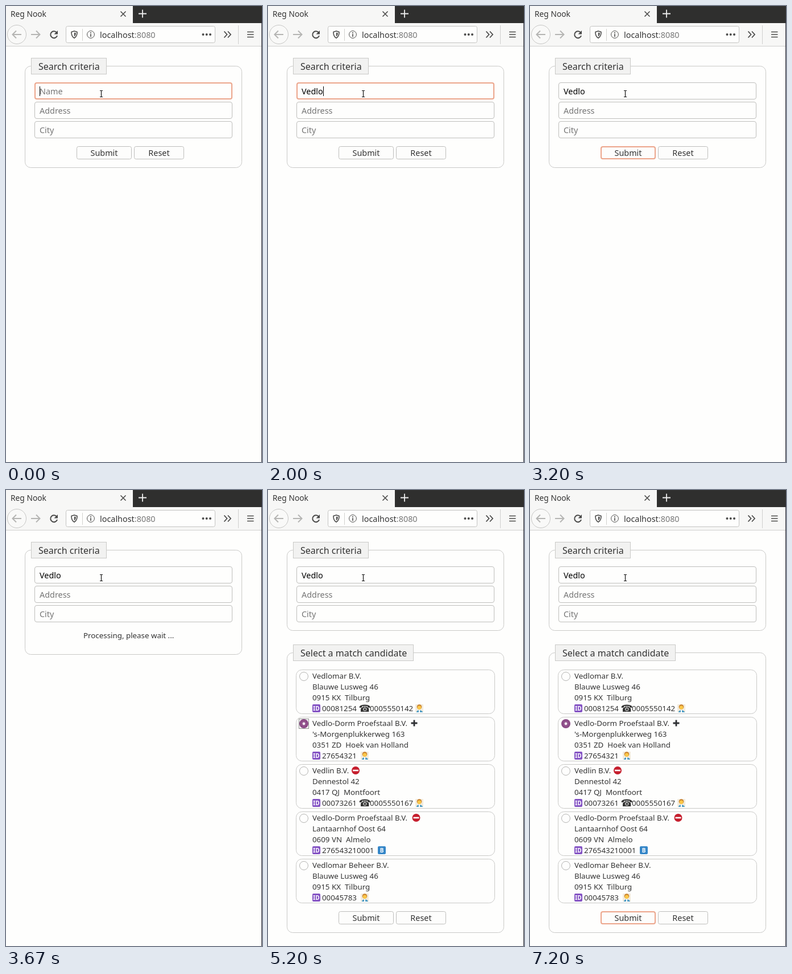
Animation, 450 px wide and 800 px high, one loop 8000 ms. Source, as an HTML page:

```html
<!DOCTYPE html>
<html lang="en">
<head>
<meta charset="utf-8">
<title>Company search</title>
<style>
  html, body { margin: 0; width: 100%; height: 100%; overflow: hidden; background: #fefefd; }
  svg { display: block; width: 450px; height: 800px; font-family: "Noto Sans", sans-serif; }
  text { white-space: pre; }
</style>
</head>
<body>
<svg id="stage" viewBox="0 0 450 800"></svg>
<script>
const LOOP = 8000;
const QUERY = 'Vedlo';
const LINE = '#c9c9c7', FOCUS = '#eca58b', INK = '#333';
const stage = document.getElementById('stage');

// Latest entry whose time has passed wins.
const typing = [[0, 0], [470, 1], [1400, 2], [1600, 3], [1730, 4], [2000, 5]];
const focus = [[0, 'name'], [2670, 'address'], [2930, 'city'], [3200, 'submit'],
  [3670, ''], [4130, 'radio'], [7200, 'submit']];
const choice = [[0, 0], [5200, 1], [5400, 2], [5600, 3], [6200, 2], [6400, 1]];
const phases = [[0, 'form'], [3670, 'wait'], [4130, 'results']];
const at = (track, t) => track.filter(([start]) => start <= t).pop()[1];

const companies = [
  { name: 'Vedlomar B.V.', street: 'Blauwe Lusweg 46', city: '0915 KX  Tilburg', id: '00081254', phone: '0005550142' },
  { name: 'Vedlo-Dorm Proefstaal B.V.', street: "'s-Morgenplukkerweg 163", city: '0351 ZD  Hoek van Holland', id: '27654321', mark: 'plus', markX: 257 },
  { name: 'Vedlin B.V.', street: 'Dennestol 42', city: '0417 QJ  Montfoort', id: '00073261', phone: '0005550167', mark: 'stop', markX: 154 },
  { name: 'Vedlo-Dorm Proefstaal B.V.', street: 'Lantaarnhof Oost 64', city: '0609 VN  Almelo', id: '276543210001', branch: true, mark: 'stop', markX: 260.5 },
  { name: 'Vedlomar Beheer B.V.', street: 'Blauwe Lusweg 46', city: '0915 KX  Tilburg', id: '00045783' }
];

const text = (x, y, s, size = 14.4, fill = INK, extra = '') =>
  `<text x="${x}" y="${y}" font-size="${size}" fill="${fill}" ${extra}>${s}</text>`;
const small = (x, y, s) => text(x, y, s, 13.333);
const box = (x, y, w, h, r = 0, stroke = LINE, fill = 'none', extra = '') =>
  `<rect x="${x}" y="${y}" width="${w}" height="${h}" rx="${r}" stroke="${stroke}" fill="${fill}" ${extra}/>`;
const path = (d, stroke, width = 2, extra = '') =>
  `<path d="${d}" stroke="${stroke}" stroke-width="${width}" fill="none" ${extra}/>`;
const disc = (x, y, r, fill, stroke = 'none') =>
  `<circle cx="${x}" cy="${y}" r="${r}" fill="${fill}" stroke="${stroke}"/>`;

function browser() {
  const dark = '#4b4b4a', pale = '#b5b5b3';
  return box(0, 0, 450, 71, 0, 'none', '#f7f7f6') +
    box(223, 0, 227, 30, 0, 'none', '#2f2f2e') +
    text(8, 19, 'Reg Nook', 13.8) +
    path('M201.5 9.5l9 9m0-9l-9 9', dark, 1.6) +
    path('M233 13.5h14M240 6.5v14', '#eee', 1.8) +
    path('M0 70.5H450', '#d0d0ce', 1) +
    disc(19, 50, 16.5, '#f9f9f8', '#c6c6c4') +
    path('M27 50H12m6-6.5L11.5 50l6.5 6.5', pale) +
    path('M44 50h15m-6-6.5l6.5 6.5-6.5 6.5', pale) +
    path('M89 46.5A6 6 0 1 0 90 52', dark) +
    `<path d="M91 43v6.5h-6.5z" fill="${dark}"/>` +
    box(105.5, 35.5, 262, 29, 3, '#c3c3c1', '#fefefd') +
    path('M120 44l5 1.5c.2 5-1 8.500-5 10.800-4-2.300-5.200-5.800-5-10.800z', dark, 1.6, 'stroke-linejoin="round"') +
    `<path d="M120 46.500l2.800.8c0 3-.8 5-2.800 6.500z" fill="${dark}"/>` +
    path('M134.500 40v21M408.500 34v33', '#d0d0ce', 1) +
    disc(149, 50, 6.4, 'none', dark) +
    path('M149 46v2m0 1v5', dark, 1.6) +
    text(165, 55.5, 'localhost<tspan fill="#777">:8080</tspan>') +
    [346.5, 352.7, 359].map(x => disc(x, 50, 2, dark)).join('') +
    path('M383.500 44.500l5 5.500-5 5.500M390 44.500l5 5.500-5 5.500', dark, 1.8) +
    path('M424 45.500h11.500m-11.500 4.500h11.500m-11.500 4.500h11.500', dark, 1.7);
}

const fieldset = (top, bottom, title, legendWidth) =>
  box(33.5, top + .5, 381, bottom - top, 10) +
  box(44.5, top - 13.5, legendWidth, 28, 0, LINE, '#f2f2f1') +
  text(57, top + 7, title, 16);

function field(y, value, hint, focused) {
  const frame = focused
    ? box(51, y + 1, 346, 28, 3, FOCUS, '#fefefd', 'stroke-width="2"')
    : box(50.5, y + .5, 347, 29, 3.5, '#bebebc', '#fefefd');
  return frame + text(59, y + 20.5, value || hint, 14.4, value ? '#000' : '#757575') +
    (focused ? `<path id="caret" data-value="${value}" d="M59.500 ${y + 7}v17" stroke="#000"/>` : '');
}

const button = (x, y, w, label, focused) =>
  (focused
    ? box(x + 1, y + 1, w - 1, 21, 3, FOCUS, '#fdfdfc', 'stroke-width="2"')
    : box(x + .5, y + .5, w, 22, 3, '#bebebc', '#fdfdfc')) +
  text(x + w / 2 + .5, y + 16.5, label, 14.4, INK, 'text-anchor="middle"');

const buttons = (y, focused) =>
  button(124, y, 96, 'Submit', focused) + button(225, y, 87, 'Reset', false);

const badge = (x, y, label, fill) =>
  box(x, y - 7, 14, 14, 2, 'none', fill) +
  text(x + 7, y + 3.7, label, 10, '#fff', 'text-anchor="middle" font-weight="700"');

const person = (x, y) =>
  box(x, y - 7, 14, 14, 1, 'none', '#f3ecdd') +
  `<path d="M${x + 2} ${y + 7}c0-5 10-5 11 0z" fill="#4d9bc4"/>` +
  disc(x + 7, y - 2.5, 4.3, '#c9822f') + disc(x + 7, y - 1.2, 3.3, '#fbc84a') +
  path(`M${x + 7} ${y + 3}v4`, '#fff', 2);

const marks = {
  plus: (x, y) => path(`M${x - 5.5} ${y}h11M${x} ${y - 5.5}v11`, '#2e3033', 2.8),
  stop: (x, y) => disc(x, y, 7, '#c51e2d') + path(`M${x - 5} ${y}h10`, '#fff', 2.6)
};

function radio(y, checked, focused) {
  const dot = checked
    ? disc(63, y, 8, '#8c4b87') + disc(63, y, 2.4, '#f6edf5') +
      `<circle cx="63" cy="${y}" r="4" fill="none" stroke="#b98ab5" stroke-dasharray="1 1.500"/>`
    : disc(63, y, 7.5, '#fefefd', '#b5b5b3');
  return dot + (focused ? box(54.5, y - 8.5, 17, 17, 0, '#222', 'none', 'stroke-dasharray="1 1"') : '');
}

function card(c, i, checked, focused) {
  const y = 326 + i * 83, idY = y + 57;
  const phone = c.phone
    ? text(159.5, idY + 5.5, '☎', 17, INK, 'font-family="DejaVu Sans, sans-serif"') + small(179, idY + 5, c.phone)
    : '';
  return box(49.5, y - 10.5, 349, 77, 10) +
    radio(y + 1, checked, focused) +
    [c.name, c.street, c.city].map((s, n) => small(78, y + 5 + n * 19, s)).join('') +
    (c.mark ? marks[c.mark](c.markX, y) : '') +
    badge(78, idY, 'ID', '#8453c4') + small(95, idY + 5, c.id) + phone +
    (c.branch ? badge(193, idY, 'B', '#3687c8') : person(c.phone ? 259 : 163, idY));
}

function results(active, chosen) {
  return fieldset(285, 776, 'Select a match candidate', 211) +
    companies.map((c, i) => card(c, i, i === chosen, i === chosen && active === 'radio')).join('') +
    buttons(739, active === 'submit');
}

function render(phase, typed, active, chosen) {
  const bottom = { form: 283, wait: 288, results: 246 }[phase];
  stage.innerHTML = box(0, 0, 450, 800, 0, 'none', '#fefefd') + browser() +
    fieldset(105, bottom, 'Search criteria', 132) +
    field(134, QUERY.slice(0, typed), 'Name', active === 'name') +
    field(168, '', 'Address', active === 'address') +
    field(202, '', 'City', active === 'city') +
    (phase === 'form' ? buttons(246, active === 'submit') : '') +
    (phase === 'wait' ? small(136, 260, 'Processing, please wait ...') : '') +
    (phase === 'results' ? results(active, chosen) : '') +
    path('M165 148.500h2l.5.5.5-.5h2M167.500 149v10M165 159.500h2l.5-.5.5.5h2', '#111', 1.2) +
    path('M449.500 22V800', '#2b2b35', 1);

  const caret = document.getElementById('caret');
  if (caret && caret.dataset.value) {
    const width = caret.previousElementSibling.getComputedTextLength();
    caret.setAttribute('transform', `translate(${Math.round(width)})`);
  }
}

let shown = '';
const begin = performance.now();
function tick() {
  const t = (performance.now() - begin) % LOOP;
  const state = [phases, typing, focus, choice].map(track => at(track, t));
  if (String(state) !== shown) {
    shown = String(state);
    render(...state);
  }
  requestAnimationFrame(tick);
}
tick();
</script>
</body>
</html>
```
